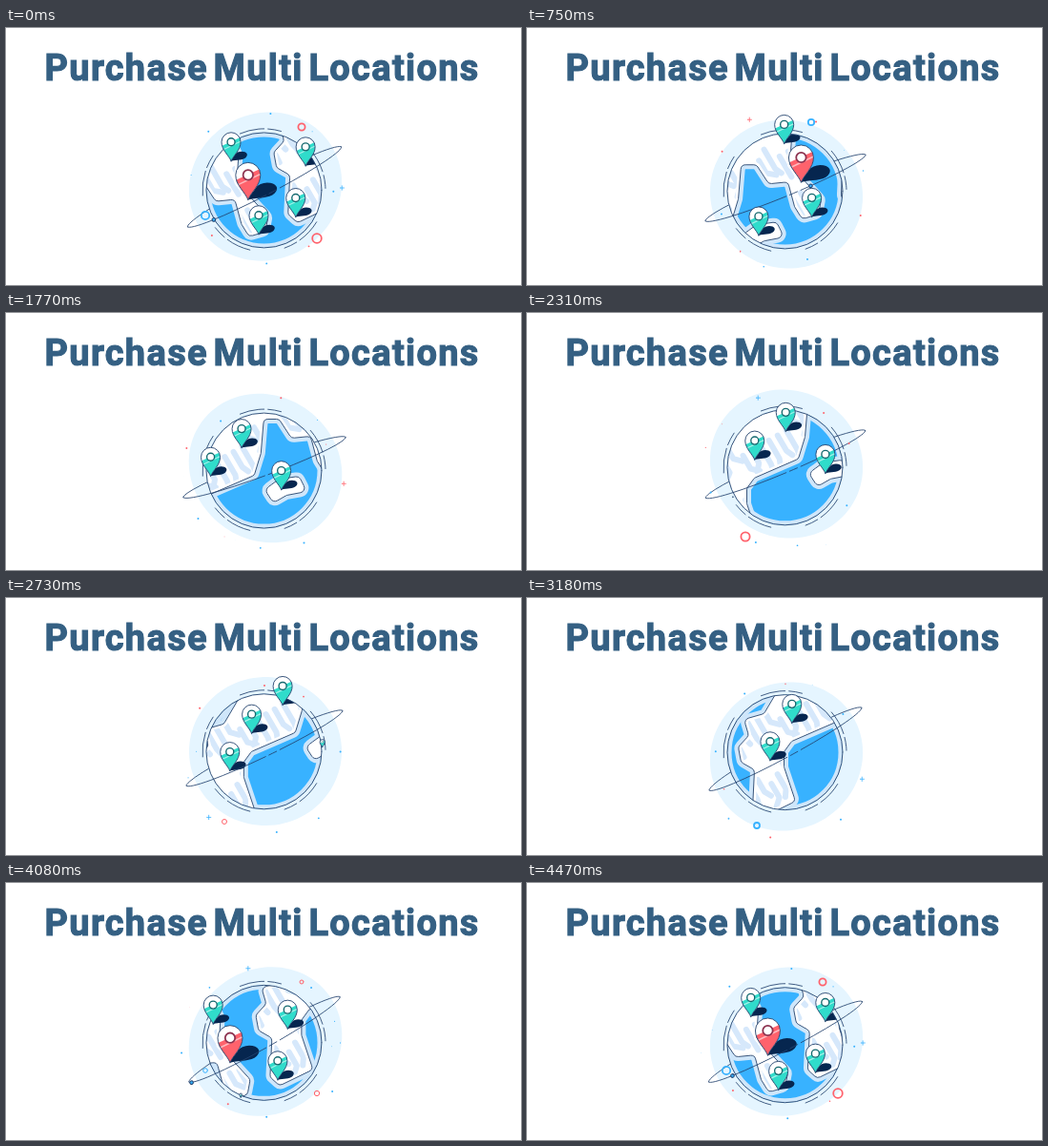
An HTML page with a canvas that plays this animation: 540x270 px, repeating every 4.5 s.

```html
<!DOCTYPE html>
<html lang="en">
<head>
<meta charset="utf-8">
<title>Purchase Multi Locations</title>
<style>
  html, body { margin: 0; width: 100%; height: 100%; overflow: hidden; background: #fff; }
  canvas { position: absolute; left: 0; top: 0; width: 540px; height: 270px; }
  h1 {
    position: absolute; left: 40.5px; top: 23px; margin: 0; white-space: nowrap;
    font: 700 38px/38px Roboto, "Open Sans", sans-serif;
    letter-spacing: 1.3px; word-spacing: -5px;
    color: #356083; -webkit-text-stroke: 1.1px #356083;
  }
</style>
</head>
<body>
<canvas></canvas>
<h1>Purchase Multi Locations</h1>
<script>
const LOOP = 4500, TAU = Math.PI * 2, RAD = Math.PI / 180;
const NAVY = '#24436e', SHADOW = '#06264f', BLUE = '#38b2ff', SHELF = '#cfe6fa',
      PALE = '#d6e8fb', BLOB = '#e5f5ff', TEAL = '#30dccb', RED = '#ff626c';
const CX = 270.5, R = 60.5;
const COS = Math.cos(30 * RAD), SIN = .5;
const WRAP = 233;              // surface length that passes in one loop
const REF = 3660, REF_Y = 165; // time and height at which the map is laid out

const canvas = document.querySelector('canvas');
const c = canvas.getContext('2d');
const dpr = window.devicePixelRatio || 1;
canvas.width = 540 * dpr;
canvas.height = 270 * dpr;

let seed = 11;
const random = (lo = 0, hi = 1) => {
  seed = seed * 16807 % 2147483647;
  return lo + (hi - lo) * seed / 2147483647;
};
const many = (n, make) => Array.from({ length: n }, (_, i) => make(i));

// Surface to stage: u runs along the turning direction, v across it
const project = (u, v, cy) => [CX + u * COS + v * SIN, cy - u * SIN + v * COS];

const coast = [
  [290, 78], [270, 112], [249, 118], [254, 135], [243, 147], [246, 163], [260, 171],
  [258, 212], [268, 221], [303, 204], [291, 168], [291, 152], [299, 141], [345, 121],
  [352, 98], [355, 62], [371, 62], [384, 82], [404, 80], [411, 106], [419, 119],
  [436, 114], [439, 98], [406, 62], [408, 33], [398, 12]
];
const island = [[371, 125], [392, 122], [400, 138], [379, 142], [365, 150], [356, 136]];

const terrain = many(44, i => {
  const u = -25 + (i >> 1) * 10.5, v = (i % 2 ? 5 : -52) + random(0, 20);
  const len = random(12, 24), turn = random(-9, 9);
  return [[u, v], [u, v + len], [u + turn, v + len + 7]].map(p => project(...p, REF_Y));
});

const pins = [
  [-14.6, -43.7], [-28, 37.4], [50.5, -.3], [14.7, 41], [-86, 26.5],
  [-100, -32.5], [-143, -23], [-19.5, .3, RED]
];

// x, y, radius, time of full size, colour
const rings = [
  [310, 104, 3.6, 0, RED], [326, 221, 4.8, 0, RED], [209, 197, 4.2, 0, BLUE],
  [298, 99, 3.2, 990, BLUE], [229, 235, 4.6, 2310, RED], [241, 239, 3, 3420, BLUE]
];
const specks = many(56, i => ({
  at: i * LOOP / 56,
  angle: i * 2.4,
  dist: random(70, 88),
  color: random() < .4 ? RED : BLUE,
  plus: i % 7 === 0
}));

const wave = (t, peak) => Math.cos(TAU * (t - peak) / LOOP);
const wrap = (v, n) => v - n * Math.round(v / n);
const clamp = v => Math.max(0, Math.min(1, v));
const pop = (t, at, half) => clamp(2.2 * (1 - Math.abs(wrap(t - at, LOOP)) / half));

function fill(color) { c.fillStyle = color; c.fill(); }

function stroke(color, width) {
  c.strokeStyle = color;
  c.lineWidth = width;
  c.stroke();
}

function disc(x, y, r) {
  c.beginPath();
  c.arc(x, y, r, 0, TAU);
}

function rounded(points, r) {
  const n = points.length, [a, z] = [points[0], points[n - 1]];
  c.beginPath();
  c.moveTo((a[0] + z[0]) / 2, (a[1] + z[1]) / 2);
  points.forEach((p, i) => c.arcTo(...p, ...points[(i + 1) % n], r));
  c.closePath();
}

function polyline(points) {
  c.beginPath();
  points.forEach(p => c.lineTo(...p));
}

function drawBlob(t) {
  const swing = 3100;
  const y = 166.5 + 8 * Math.sin(TAU * Math.min(t, swing) / swing);
  const skew = -.045 * wave(t, 3850);
  c.beginPath();
  for (let a = 0; a < TAU; a += .06) {
    const r = 1 + skew * Math.sin(2 * a);
    c.lineTo(272 + 80 * r * Math.cos(a), y + 78 * r * Math.sin(a));
  }
  c.closePath();
  fill(BLOB);
}

function drawLand(points) {
  c.save();
  rounded(points, 5);
  fill('#fff');
  c.clip();
  if (points === coast) terrain.forEach(p => { polyline(p); stroke(PALE, 6); });
  rounded(points, 5);
  stroke('#fff', 6);
  c.restore();
  rounded(points, 5);
  stroke(NAVY, .9);
}

function drawMap(t, cy) {
  const shift = WRAP * (t - REF) / LOOP;
  const tile = draw => {
    for (const n of [-1, 0, 1]) {
      const k = shift + n * WRAP;
      c.save();
      c.translate(k * COS, cy - REF_Y - k * SIN);
      [coast, island].forEach(draw);
      c.restore();
    }
  };
  tile(points => { rounded(points, 5); stroke(SHELF, 9); });
  disc(CX, cy, R);
  stroke(SHELF, 9);
  tile(drawLand);
}

function drawOrbit(cy, tilt, from, to) {
  c.beginPath();
  c.ellipse(CX + .5, cy - 3.5, 91, 8.5, -tilt, from, to);
  c.setLineDash([78, 4, 9, 4, 120, 4]);
  stroke(NAVY, .85);
  c.setLineDash([]);
}

function drawMoon(t, cy, tilt) {
  const a = (-44 + 360 * t / LOOP) * RAD;
  if (Math.cos(a) < 0) return;
  c.save();
  c.translate(CX + .5, cy - 3.5);
  c.rotate(-tilt);
  disc(91 * Math.sin(a), 8.5 * Math.cos(a), 1.8);
  fill(BLUE);
  stroke(NAVY, 1);
  c.restore();
}

function drawShadow({ x, y, size, color }) {
  const s = size * (color === RED ? 1 : .72);
  c.save();
  c.translate(x, y);
  c.scale(s, s);
  c.beginPath();
  c.moveTo(0, 0);
  c.bezierCurveTo(3, -9, 10, -18, 20, -18);
  c.bezierCurveTo(30, -18, 33, -12, 28, -7);
  c.bezierCurveTo(22, -1, 11, -3, 0, 0);
  fill(SHADOW);
  c.restore();
}

function pinBody() {
  c.beginPath();
  c.moveTo(0, 0);
  c.bezierCurveTo(-3, -8, -13, -15, -13, -26);
  c.arc(0, -26, 13, Math.PI, TAU);
  c.bezierCurveTo(13, -15, 3, -8, 0, 0);
  c.closePath();
}

function drawPin({ x, y, size, color }) {
  c.save();
  c.translate(x, y);
  c.scale(size, size);
  c.save();
  pinBody();
  fill('#fff');
  c.clip();
  polyline([[-14, -20], [14, -33], [14, 2], [-14, 2]]);
  fill(color);
  polyline([[-12, -15], [13, -27]]);
  stroke('rgba(255,255,255,.55)', 1.6);
  c.restore();
  pinBody();
  stroke(NAVY, .9 / size);
  disc(0, -26, 5.2);
  fill('#fff');
  stroke(color === RED ? '#8d3350' : '#14696f', 1.8);
  c.restore();
}

function placePins(t, cy) {
  return pins.map(([u0, v, color = TEAL]) => {
    const u = wrap(u0 + WRAP * t / LOOP, WRAP);
    const [x, y] = project(u, v, cy);
    const size = clamp((63 - Math.hypot(u, v)) / 6) * (color === RED ? 1 : .77);
    return { x, y, size, color };
  }).filter(p => p.size > 0);
}

function drawBits(t) {
  for (const [x, y, r, at, color] of rings) {
    const s = pop(t, at, 560);
    if (!s) continue;
    disc(x, y, r * s);
    stroke(color, 1.8 * s);
  }
  for (const { at, angle, dist, color, plus } of specks) {
    const s = pop(t, at, 420);
    if (!s) continue;
    const d = dist + wrap(t - at, LOOP) * .004;
    const x = CX + d * Math.cos(angle), y = 168 + d * Math.sin(angle);
    if (plus) {
      const arm = 2.2 * s;
      polyline([[x - arm, y], [x + arm, y]]);
      c.moveTo(x, y - arm);
      c.lineTo(x, y + arm);
      stroke(color, .8);
    } else {
      disc(x, y, s);
      fill(color);
    }
  }
}

function render(t) {
  const cy = 166.5 + 5.2 * wave(t, 520);
  const tilt = (25 - 5 * wave(t, 1500)) * RAD;
  const shown = placePins(t, cy);
  c.setTransform(dpr, 0, 0, dpr, 0, 0);
  c.clearRect(0, 0, 540, 270);
  c.lineCap = c.lineJoin = 'round';

  drawBlob(t);
  c.beginPath();
  c.arc(CX, cy, 64.5, 175 * RAD, 535 * RAD);
  c.setLineDash([26, 4, 14, 37]);
  stroke(NAVY, .85);
  drawOrbit(cy, tilt, Math.PI, TAU);

  c.save();
  disc(CX, cy, R);
  fill(BLUE);
  c.clip();
  drawMap(t, cy);
  shown.forEach(drawShadow);
  c.restore();
  disc(CX, cy, R);
  stroke(NAVY, .9);

  drawOrbit(cy, tilt, 0, Math.PI);
  drawMoon(t, cy, tilt);
  shown.forEach(drawPin);
  drawBits(t);
}

const start = performance.now();
function tick() {
  render((performance.now() - start) % LOOP);
  requestAnimationFrame(tick);
}
tick();
</script>
</body>
</html>
```
